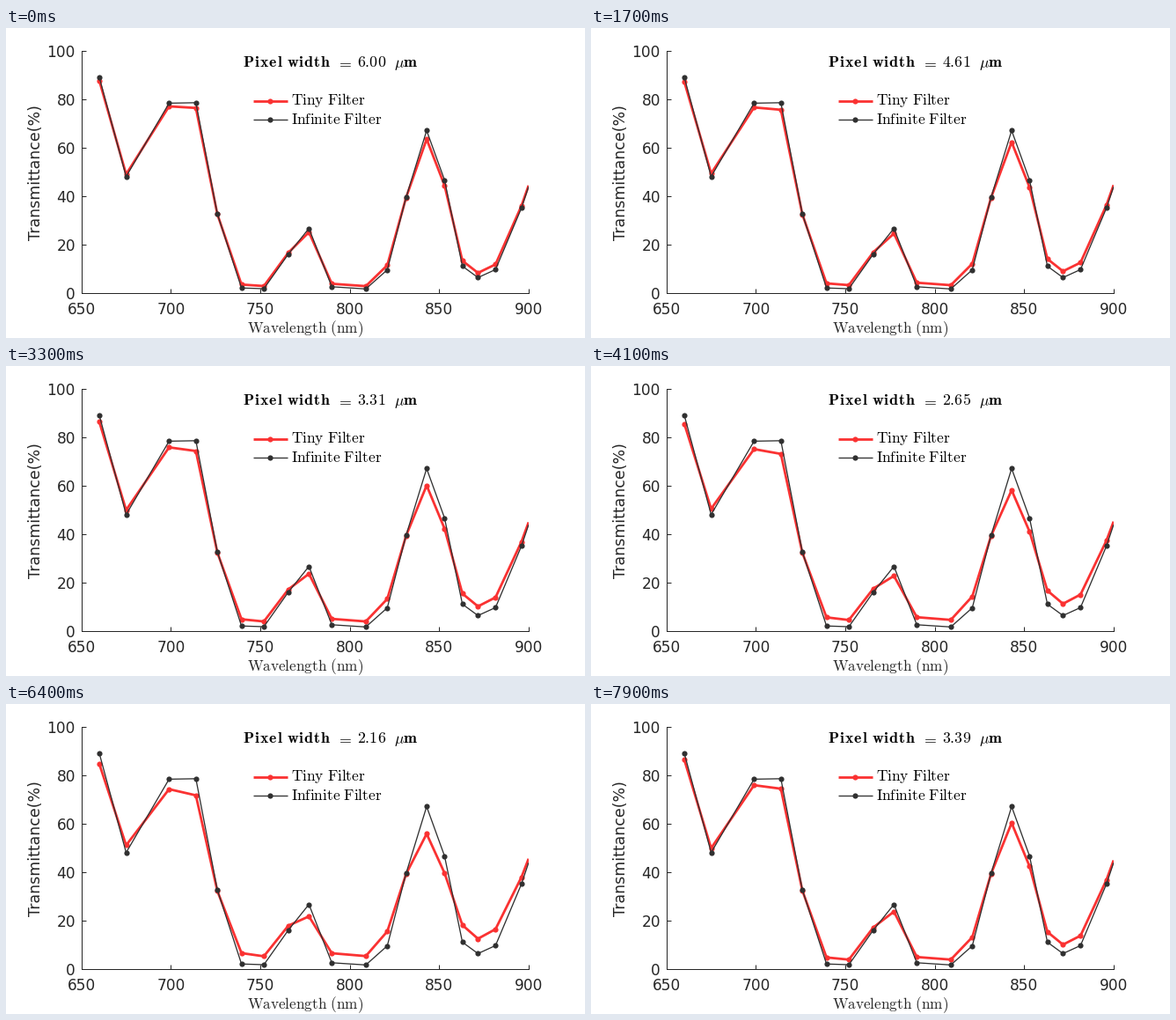
These frames come from a looping animation (658 px wide and 352 px high, 8000 ms). A matplotlib script:

```python
import matplotlib.pyplot as plt
import numpy as np
from matplotlib.animation import FuncAnimation
from matplotlib.lines import Line2D

W, H, DPI = 658, 352, 100
PX = 72 / DPI  # points per pixel
FRAMES, INTERVAL = 80, 100
SWEEP, HOLD_END = 49, 62
WIDE, NARROW = 6.0, 2.0

RED, DARK, AXIS = "#fa3232", "#303030", "#262626"

plt.rcParams["font.family"] = "DejaVu Sans"
plt.rcParams["mathtext.fontset"] = "cm"

# Wavelength, infinite-filter transmittance, shift at the narrowest pixel
wavelength, infinite, shift = np.array([
    (660, 89, -4.8), (675, 48, 3.3), (699, 78.3, -4.5), (714, 78.5, -7.5),
    (726, 32.6, -0.5), (739.5, 2, 4.9), (752, 1.7, 3.8), (765.7, 16, 2),
    (777.2, 26.6, -5.4), (790, 2.5, 4.3), (809, 1.6, 4), (821, 9.5, 6.5),
    (831.5, 39.4, -0.3), (843, 67, -12.3), (853, 46.6, -7.7), (863, 11, 7.7),
    (871.7, 6.3, 6.7), (881.5, 9.6, 7.4), (896, 35, 3.1), (900, 43.8, 1.8),
]).T


def pixel_width(frame):
    step = (WIDE - NARROW) / SWEEP
    if frame <= SWEEP:
        return WIDE - step * frame
    return NARROW + step * max(0, frame - HOLD_END)


def tiny_curve(width):
    """The shift fades as a power of the pixel width."""
    return infinite + shift * (NARROW / width) ** 1.13


fig = plt.figure(figsize=(W / DPI, H / DPI), dpi=DPI, facecolor="white")


def label(x, y, text, size, color="black", **kwargs):
    return fig.text(x / W, 1 - y / H, text, fontsize=size * PX, color=color,
                    va="baseline", **kwargs)


def tracked(text):
    """Bold math text with even letter spacing, tight around the point."""
    gap = r"\hspace{0.07}"
    return rf"$\mathbf{{{gap.join(text).replace(gap + '.' + gap, '.')}}}$"


def bold(x, text, ha="center"):
    return label(x, 44, tracked(text), 17.8, ha=ha)


def line_style(color, width):
    return dict(color=color, lw=width * PX, marker="o", ms=6.2 * PX,
                mew=0, solid_capstyle="butt")


left, right, top, bottom = 85.7, 593.9, 25.7, 300.7
ax = fig.add_axes([left / W, 1 - bottom / H,
                   (right - left) / W, (bottom - top) / H])
ax.set(xlim=(650, 900), ylim=(0, 100),
       xticks=range(650, 901, 50), yticks=range(0, 101, 20))
ax.spines[["top", "right"]].set_visible(False)
for side in ("left", "bottom"):
    ax.spines[side].set(color=AXIS, linewidth=PX)
ax.tick_params(direction="in", length=5 * PX, width=PX, color=AXIS,
               labelcolor=AXIS, labelsize=17 * PX)
ax.tick_params(axis="x", pad=10.5 * PX)
ax.tick_params(axis="y", pad=6.7 * PX)

red_style, dark_style = line_style(RED, 2.8), line_style(DARK, 1.3)
markers = slice(0, -1)
tiny_line, = ax.plot(wavelength, tiny_curve(WIDE), markevery=markers,
                     zorder=3, **red_style)
ax.plot(wavelength, infinite, markevery=markers, zorder=4, **dark_style)

label(38.7, 164, "Transmittance(%)", 17.4, AXIS, rotation=90, ha="center",
      rotation_mode="anchor")
label(340, 346, r"$\mathrm{Wavelength\ (nm)}$", 17.2, AXIS, ha="center")

for y, name, style in ((82.5, r"Tiny\ Filter", red_style),
                       (103.8, r"Infinite\ Filter", dark_style)):
    xs = np.array([280.5, 300.2, 320]) / W
    fig.add_artist(Line2D(xs, [1 - y / H] * 3, markevery=[1], **style))
    label(323.5, y + 5, rf"$\mathrm{{{name}}}$", 17.3)

bold(269, "Pixel", ha="left")
bold(344.5, "width")
bold(384, "=")
number = bold(416, "6.00")
label(441, 44, r"$\mu$", 17.3)
bold(468, "m", ha="right")


def update(frame):
    width = pixel_width(frame)
    tiny_line.set_ydata(tiny_curve(width))
    number.set_text(tracked(f"{width:.2f}"))
    return tiny_line, number


anim = FuncAnimation(fig, update, frames=FRAMES, interval=INTERVAL,
                     repeat=True, repeat_delay=0)
plt.show()
```
